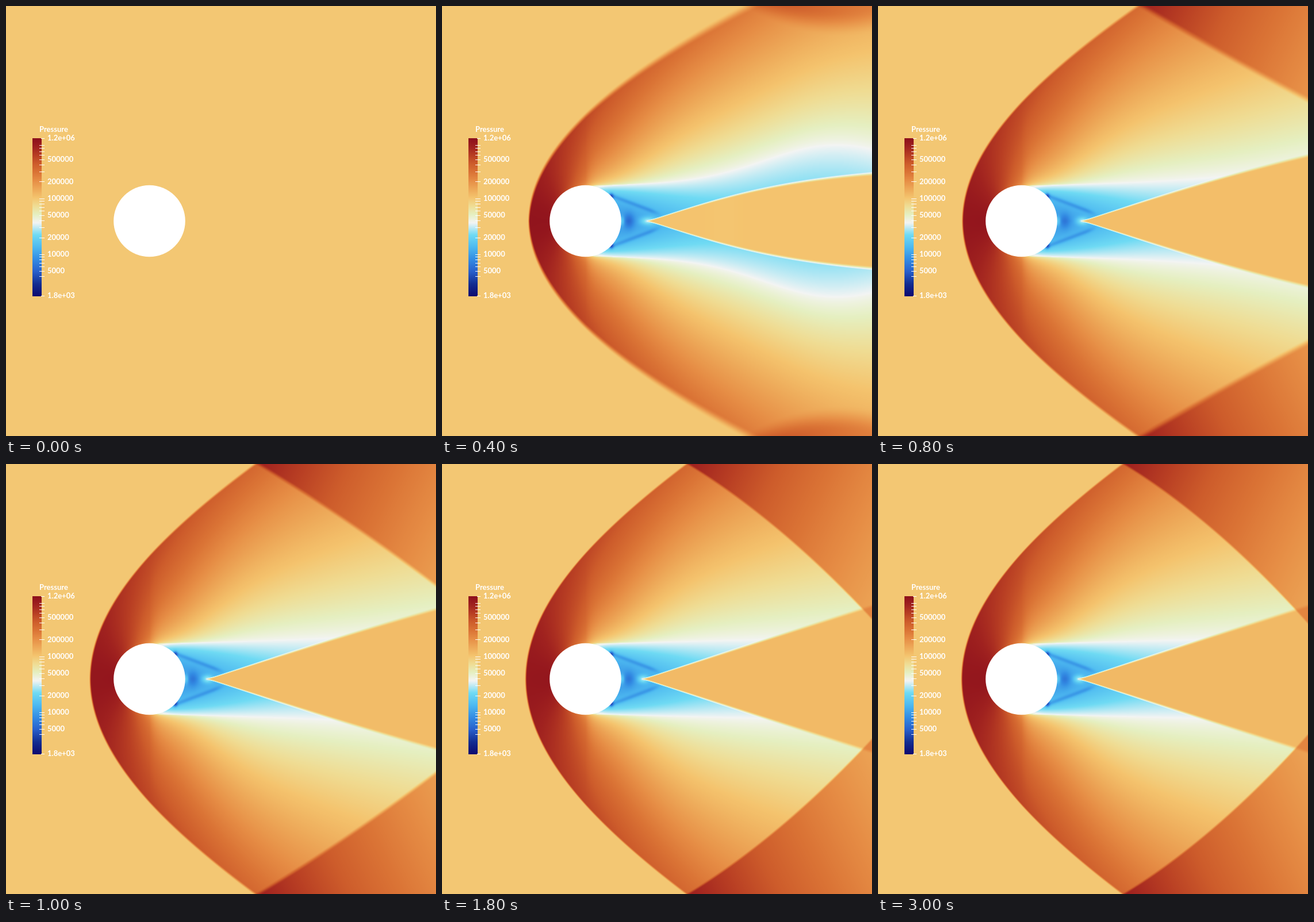
These frames come from a looping animation (748x748 px, 3.1 s). An HTML page with a canvas:

```html
<!DOCTYPE html>
<html lang="en">
<head>
<meta charset="utf-8">
<title>Pressure around a cylinder</title>
<style>
html, body { margin: 0; width: 100%; height: 100%; overflow: hidden; background: #f3c773; }
canvas { display: block; }
</style>
</head>
<body>
<canvas id="stage" width="748" height="748"></canvas>
<script>
const SIZE = 748, STEP = 100, LOOP = 3100, CX = 249.5, MID = 373.5;
const AMBIENT = 0.617, WHITE = 0.465;
const ctx = document.getElementById('stage').getContext('2d');

const clamp = (v, lo = 0, hi = 1) => Math.min(hi, Math.max(lo, v));
const mix = (a, b, f) => a + (b - a) * f;
const ease = f => (f = clamp(f), f * f * (3 - 2 * f));
const bell = (a, b = 0) => Math.exp(-a * a - b * b);

// Evenly spaced colours below and above the white level.
const COLD = '0c0a70 122d91 285fcb 338ce3 4db9f0 6fdaf3 f3f4f3'.split(' ');
const WARM = 'f3f4f3 e5efc0 efdc93 f4c36d eda858 e68d45 da7335 cd5c2b b83e23 a0221f 8c0f1c'.split(' ');

function colourAt(v) {
  const ramp = v < WHITE ? COLD : WARM;
  const at = (ramp.length - 1) * (v < WHITE ? v / WHITE : (v - WHITE) / (1 - WHITE));
  const i = Math.min(ramp.length - 2, Math.floor(at));
  return [0, 2, 4].map(k => {
    const [a, b] = [ramp[i], ramp[i + 1]].map(hex => parseInt(hex.slice(k, k + 2), 16));
    return Math.round(mix(a, b, at - i));
  });
}

const LEVELS = 1023;
const palette = Uint32Array.from({ length: LEVELS + 1 }, (_, i) => {
  const [r, g, b] = colourAt(i / LEVELS);
  return (255 << 24 | b << 16 | g << 8 | r) >>> 0;
});

function flowAt(time) {
  const decay = span => Math.exp((200 - time) / span);
  const noseX = 143.2 + 10.8 * decay(300);
  // Bow shock: h² = P·d + Q·d², with d the distance behind the nose.
  const P = mix(348, 436, ease((time - 350) / 850));
  const Q = 0.243 - 0.6 * decay(150);
  const u = time / 600;
  return {
    noseX, P, Q,
    wallX: noseX + (Math.sqrt(P * P + 4 * Q * 374 * 374) - P) / (2 * Q),
    push: 1.2 * decay(290),
    blur: 2 + 33 * decay(270),
    deep: 1 + decay(200),
    core: 0.645 - 0.03 * decay(500),
    dip: 0.04 * decay(90),
    bulge: 70 * u * u * Math.exp(2 - 2 * u),
    bulgeX: 300 + 0.95 * time,
    limit: 62 / decay(470),
    apex: 349.5 + 8.5 * ease((1100 - time) / 500),
    front: 180 + 1.8 * time,
    reflect: clamp((time - 200) / 300),
    bend: 0.0008 - 0.0015 * Math.exp((600 - time) / 400)
  };
}

// Streaks and eddies close behind the cylinder.
function baseEddies(x, h, f) {
  const shear = 44 - 0.38 * (x - 295);
  return -0.06 * bell((h - shear) / 4) * ease((x - 288) / 8) * ease((385 - x) / 25)
    - 0.17 * bell((x - 294) / 4, (h - 43) / 5)
    - 0.06 * f.deep * bell((x - 325) / 9, h / 14)
    + 0.1 * bell((x - 313) / 4, h / 8)
    + 0.15 * bell((x - f.apex) / (10 * f.deep), h / 7);
}

// Logarithmic pressure, 0 to 1, at distance h from the axis.
function pressure(x, h, f) {
  // Ray through the point: radial ahead of the centre, vertical behind it.
  const originX = Math.max(x, CX), dx = originX - x, r = Math.hypot(dx, h);
  const c = dx / r, s = h / r, e = originX - f.noseX;
  const C = Math.max(0, f.P * e + f.Q * e * e);
  const B = c * (f.P + 2 * f.Q * e);
  const shockR = 2 * C / (B + Math.sqrt(B * B + 4 * (s * s - f.Q * c * c) * C));
  const inside = ease((shockR - r) / (4 + f.blur * h / 374));

  const lean = 2 * shockR * s / Math.max(1, f.P + 2 * f.Q * (e - shockR * c));
  const mach2 = 9 / (1 + lean * lean) + f.push;
  const jump = Math.max(1, 1 + 1.167 * (mach2 - 1));
  const shockV = Math.min(0.985, AMBIENT + Math.log(jump) / 6.502);

  const away = Math.max(0, x - CX), rise = ease((x - f.front) / 100);
  let baseR = 61, baseV;
  if (x < CX) {
    baseV = 0.985 - 0.1357 * Math.atan2(h, dx) ** 1.9;
  } else {
    baseR += 0.025 * away + f.bulge * bell((x - f.bulgeX) / (0.39 * (f.bulgeX - CX)));
    baseV = WHITE + 0.11 * rise + 0.2 * Math.exp(-away / 12);
  }
  const height = clamp((r - baseR) / Math.max(1, shockR - baseR));
  let v = mix(baseV, shockV, height ** (0.76 - 0.46 * bell(away / 130)));

  if (x > CX && h < baseR) {
    const rate = 0.001 + 0.0085 * Math.exp((300 - x) / 90);
    v -= 0.24 * (1 - Math.exp(-(baseR - h) * rate / 0.24)) * (1 - rise);
    if (x > 280 && x < 390) v += baseEddies(x, h, f);
  }

  let core = 0;
  if (x > f.apex - 40) {
    const wedge = f.limit * Math.tanh(0.32 * (x - f.apex) / f.limit);
    const width = 4 + Math.max(0, 0.012 * (x - f.apex));
    core = ease((wedge - h) / width + 0.5) * (1 - ease((x - f.front - 80) / 70));
    v = mix(v, f.core - f.dip * bell((x - 490) / 25), core);
  }

  const fade = 1 - ease((x + 0.7 * h - 1.67 * f.front) / 250 + 1);
  v = mix(AMBIENT, v, inside * fade);

  const past = x - f.wallX;
  if (past > -20) {
    const reflected = 374 - 0.6 * past - f.bend * past * past;
    const hit = ease((h - reflected) / (2 + 2.5 * f.blur)) * f.reflect;
    const q = Math.max(0, past) + 0.5 * (374 - h);
    v = mix(v, mix(0.96 - 0.00078 * q + 4e-7 * q * q, 0.75, core), hit);
  }
  return v;
}

function renderField(time) {
  const image = ctx.createImageData(SIZE, SIZE);
  const pixels = new Uint32Array(image.data.buffer);
  pixels.fill(palette[Math.round(AMBIENT * LEVELS)]);
  if (time < STEP) return image;
  const flow = flowAt(time);
  for (let row = 0; row < SIZE / 2; row++) {
    const top = row * SIZE, bottom = (SIZE - 1 - row) * SIZE;
    for (let x = 135; x < SIZE; x++) {
      const level = Math.round(clamp(pressure(x, MID - row, flow)) * LEVELS);
      pixels[top + x] = pixels[bottom + x] = palette[level];
    }
  }
  return image;
}

function drawLegend() {
  const top = 230, bottom = 504;
  const yOf = value => bottom - (bottom - top) * Math.log(value / 1800) / 6.502;
  for (let y = top; y <= bottom; y++) {
    ctx.fillStyle = `rgb(${colourAt((bottom - y) / (bottom - top))})`;
    ctx.fillRect(46, y, 16, 1);
  }
  ctx.fillStyle = '#fff';
  ctx.font = 'bold 13px Lato, sans-serif';
  const tick = (y, x = 58) => ctx.fillRect(x, Math.round(y), 67 - x, 1);
  const label = (text, y) => ctx.fillText(text, 72, y + 4.3);
  for (let decade = 1e3; decade < 1e6; decade *= 10) {
    for (let n = 1; n < 10; n++) {
      const value = n * decade;
      if (value < 4000) continue;
      tick(yOf(value));
      if ([1, 2, 5].includes(n)) label(String(value), yOf(value));
    }
  }
  for (const [text, y] of [['1.2e+06', top], ['1.8e+03', bottom]]) {
    tick(y, 61);
    label(text, y);
  }
  ctx.fillText('Pressure', 58, 218.5);
}

const fields = [];
let shown = -1;

function draw() {
  const step = Math.floor(performance.now() % LOOP / STEP);
  if (step !== shown) {
    shown = step;
    fields[step] ||= renderField(step * STEP);
    ctx.putImageData(fields[step], 0, 0);
    ctx.fillStyle = '#fff';
    ctx.beginPath();
    ctx.arc(CX, 374, 62.3, 0, 2 * Math.PI);
    ctx.fill();
    drawLegend();
  }
  requestAnimationFrame(draw);
}
draw();
</script>
</body>
</html>
```
